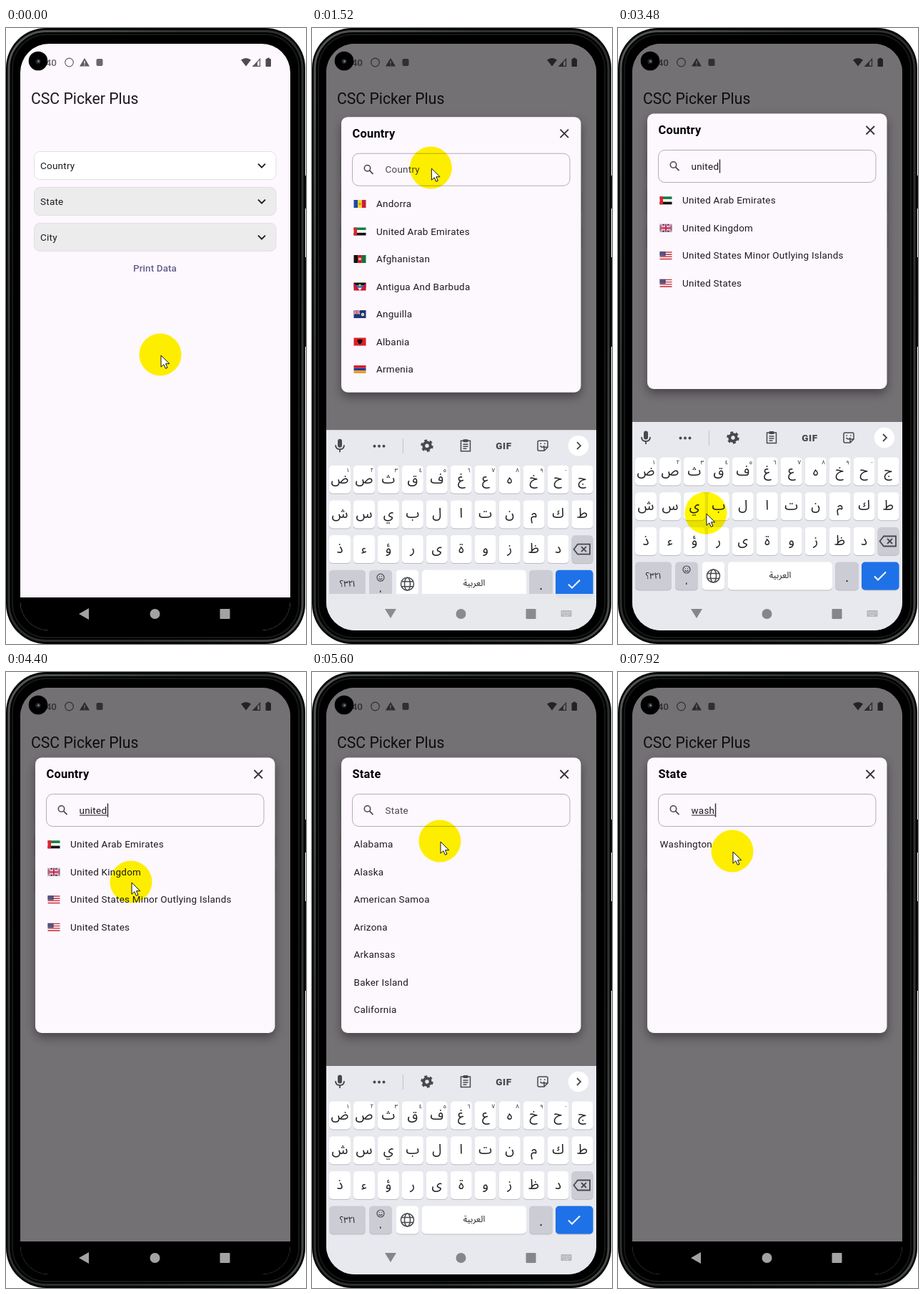
Recreate the animation shown at these times as an HTML page. Size 420x860 px, loop 8000 ms.

```html
<!DOCTYPE html>
<html lang="en">
<head>
<meta charset="utf-8">
<title>Country and state picker</title>
<style>
html, body { margin: 0; width: 100%; height: 100%; overflow: hidden; background: #fff; }
svg { display: block; width: 420px; height: 860px; }
text { font: 13.48px Roboto, sans-serif; letter-spacing: .24px; fill: #1d1b20; white-space: pre; }
.head { font-size: 21.2px; letter-spacing: 0; }
.title { font-size: 16.4px; font-weight: 700; fill: #000; }
.button { font-weight: 500; letter-spacing: .1px; fill: #65608c; }
.clock { font-weight: 500; letter-spacing: 0; fill: #6b676c; }
.hint { fill: #49454f; }
.ar { font-family: "Noto Sans Arabic", "Noto Sans", "DejaVu Sans", sans-serif; letter-spacing: 0; text-anchor: middle; fill: #202124; }
.line { fill: none; stroke: #47494d; stroke-width: 1.8; }
.mid { text-anchor: middle; }
</style>
</head>
<body>
<svg viewBox="0 0 420 860" xmlns="http://www.w3.org/2000/svg">
  <defs>
    <clipPath id="screen"><rect x="20" y="22" width="378" height="819" rx="40"/></clipPath>
    <linearGradient id="rim" x2="1" y2="1">
      <stop offset="0" stop-color="#555957"/><stop offset=".3" stop-color="#2c302e"/>
      <stop offset=".7" stop-color="#2c302e"/><stop offset="1" stop-color="#474b49"/>
    </linearGradient>
  </defs>
  <rect x="417" y="206" width="3" height="46" fill="#111"/>
  <rect x="417" y="320" width="3" height="125" fill="#111"/>
  <rect width="419" height="860" rx="56" fill="#050606"/>
  <rect x="4" y="4.500" width="411" height="851" rx="52" fill="#000" stroke="url(#rim)" stroke-width="3"/>
  <rect x="9" y="9" width="401" height="842" rx="48" fill="#000" stroke="#151817" stroke-width="2"/>
  <g clip-path="url(#screen)">
    <rect x="20" y="22" width="378" height="819" fill="#fdf7fe"/>
    <g id="status"></g>
    <text class="head" x="35" y="106">CSC Picker Plus</text>
    <g id="form"></g>
    <rect id="scrim" x="20" y="22" width="378" height="819" opacity="0"/>
    <g id="dialog"></g>
    <rect x="20" y="795" width="378" height="50"/>
    <g fill="#a3a3a3">
      <path d="M102 818l14-8v16z"/><circle cx="208.500" cy="818" r="7"/><rect x="299.500" y="811" width="14" height="14" rx="1"/>
    </g>
    <g id="keyboard"></g>
    <g id="nav" fill="#85868a">
      <rect x="20" y="790" width="378" height="55" fill="#e8e9ee"/>
      <path d="M102 811h16l-8 13z"/><circle cx="208.500" cy="818" r="7"/><rect x="299.500" y="811" width="14" height="14" rx="1"/>
      <rect x="348.500" y="813" width="15" height="9" rx="1" fill="#b4b5ba"/>
      <path d="M350 815.500h12M350 818h12M352.500 820.500h7" stroke="#e8e9ee" stroke-dasharray="1.500 1"/>
    </g>
  </g>
  <circle cx="45" cy="46" r="13.300"/>
  <circle cx="45" cy="46.500" r="3.500" fill="#24282b"/><circle cx="45.500" cy="46.500" r="1.300" fill="#8d9498"/>
  <g id="halo" style="mix-blend-mode:multiply"><circle r="29.500" fill="#fff600"/></g>
  <path id="arrow" d="M1 1v16.200l3.900-3.500 2.500 5.600 2.600-1.100-2.500-5.500h5.300z" fill="#fff" stroke="#111" stroke-linejoin="round"/>
</svg>
<script>
const $ = id => document.getElementById(id);
const rect = (x, y, w, h, fill, more = '') => `<rect x="${x}" y="${y}" width="${w}" height="${h}" fill="${fill}" ${more}/>`;
const dot = (x, y, r, fill) => `<circle cx="${x}" cy="${y}" r="${r}" fill="${fill}"/>`;
const text = (x, y, s, cls = '', more = '') => `<text x="${x}" y="${y}" class="${cls}" ${more}>${s}</text>`;
const path = (d, more = '') => `<path d="${d}" ${more}/>`;

// Flags, 17 by 11
const rows = (...c) => c.map((f, i) => rect(0, i * 11 / c.length, 17, 11 / c.length, f)).join('');
const cols = (...c) => c.map((f, i) => rect(i * 17 / c.length, 0, 17 / c.length, 11, f)).join('');
const union = '<g>' + rect(0, 0, 17, 11, '#1d3a80')
  + path('M0 0L17 11M17 0L0 11', 'stroke="#fff" stroke-width="2.4"') + path('M0 0L17 11M17 0L0 11', 'stroke="#d0233c" stroke-width=".9"')
  + path('M8.500 0V11M0 5.500H17', 'stroke="#fff" stroke-width="3.800"') + path('M8.500 0V11M0 5.500H17', 'stroke="#d0233c" stroke-width="2.200"') + '</g>';
const ensign = rows('#1c3578') + `<g transform="scale(.5)">${union}</g>`;
const stars = rows('#c8313e', '#fff', '#c8313e', '#fff', '#c8313e', '#fff', '#c8313e') + rect(0, 0, 8, 6, '#3c3b6e')
  + path('M1 1.500H7M1 3H7M1 4.500H7', 'stroke="#b9b9d0" stroke-width=".6" stroke-dasharray=".8 .7"');
const flags = {
  AD: cols('#1d4aa0', '#f6d21c', '#cf1a3b') + dot(8.5, 5.5, 1.6, '#b9863f'),
  AE: rows('#148040', '#fff', '#111') + rect(0, 0, 4.5, 11, '#e0222f'),
  AF: cols('#111', '#c4161f', '#11753a') + dot(8.5, 5.5, 2, '#e8b9b5'),
  AG: rows('#111', '#2270c0', '#fff') + path('M0 0L8.500 11H0zM17 0L8.500 11H17z', 'fill="#cd1530"') + dot(8.5, 3.5, 1.6, '#f6cf1c'),
  AI: ensign + dot(12.5, 6, 2.2, '#eee') + dot(12.5, 6, 1, '#e58a2c'),
  AL: rows('#dd1f26') + path('M8.500 2l4 1-1.500 4-2.500 2.500L6 7 4.500 3z', 'fill="#111"'),
  AM: rows('#d4202c', '#1e3c9a', '#ee9d1f'),
  AU: ensign + dot(4, 8.5, 1, '#fff') + dot(13, 3, .8, '#fff') + dot(13, 8, .8, '#fff'),
  AW: rows('#4189dd') + rect(0, 7, 17, .8, '#f9d616') + dot(3, 3, 1.2, '#d21034'),
  BE: cols('#111', '#fae042', '#ed2939'),
  BF: rows('#ef2b2d', '#009e49') + dot(8.5, 5.5, 1.7, '#fcd116'),
  BI: rows('#ce1126', '#1eb53a', '#ce1126') + dot(8.5, 5.5, 2.8, '#fff'),
  BN: rows('#f7e017') + path('M0 1L17 8', 'stroke="#fff" stroke-width="3"') + path('M0 3L17 10', 'stroke="#111" stroke-width="1.500"'),
  GB: union,
  HU: rows('#ce2939', '#fff', '#477050'),
  RE: cols('#22409a', '#fff', '#e0303a'),
  TN: rows('#e0202a') + dot(8.5, 5.5, 3, '#fff') + dot(8.5, 5.5, 1.5, '#e0202a'),
  US: stars, UM: stars
};
const flag = (code, x, y) => `<g transform="translate(${x} ${y})">${flags[code]}</g>`;

const names = {
  AD: 'Andorra', AE: 'United Arab Emirates', AF: 'Afghanistan', AG: 'Antigua And Barbuda', AI: 'Anguilla', AL: 'Albania',
  AM: 'Armenia', AU: 'Australia', AW: 'Aruba', BE: 'Belgium', BF: 'Burkina Faso', BI: 'Burundi', BN: 'Brunei',
  GB: 'United Kingdom', HU: 'Hungary', RE: 'Reunion', TN: 'Tunisia', UM: 'United States Minor Outlying Islands', US: 'United States'
};
const states = ['Alabama', 'Alaska', 'American Samoa', 'Arizona', 'Arkansas', 'Baker Island', 'California', 'Delaware', 'Hawaii',
  'Howland Island', 'Iowa', 'New Hampshire', 'New Jersey', 'New Mexico', 'Wake Island', 'Washington'];
const modes = {
  Country: { items: Object.entries(names), word: 'united', start: 2390, step: 100, opened: 1130, hidden: 3960 },
  State: { items: states.map(s => ['', s]), word: 'wash', start: 5920, step: 160, opened: 5200, hidden: 7400 }
};

// Static parts
$('status').innerHTML = text(71, 53, '2:40', 'clock', 'text-anchor="end"')
  + '<circle cx="88.500" cy="48" r="5.800" fill="none" stroke="#6b676c" stroke-width="1.200"/>'
  + path('M110 42l7 11.500h-14z', 'fill="#5f5b60"') + path('M110 46v4M110 51v1.300', 'stroke="#fdf7fe" stroke-width="1.300"')
  + rect(126.5, 43, 9, 10, '#6b676c', 'rx="2"')
  + path('M329 44.500q7-5 14 0l-7 9z', 'fill="#4f4b50"')
  + path('M346 53.300h9.500v-10z', 'fill="none" stroke="#5f5b60" stroke-width="1.300"') + path('M346 53.300h6v-6z', 'fill="#5f5b60"')
  + rect(363.5, 43, 7.5, 11, '#4f4b50', 'rx="1"') + rect(365.5, 41.7, 3.5, 2, '#4f4b50');

const field = (y, label, on, code) => rect(39.5, y, 338.5, 39, on ? '#fff' : '#ececec', 'rx="8" stroke="#e3dee5"')
  + (code ? flag(code, 48, y + 14) : '') + text(code ? 79 : 48, y + 24, label)
  + path(`M353 ${y + 17.2}l5 5 5-5`, 'fill="none" stroke="#1d1b20" stroke-width="1.900"');
const form = picked => field(172.5, picked ? names.US : 'Country', true, picked && 'US')
  + field(222.5, 'State', picked) + field(272.5, 'City', false)
  + text(208.5, 340, 'Print Data', 'button mid')
  + (picked ? flag('US', 152, 362.5) + text(183, 373, names.US) : '');

function keyboard() {
  const key = (x, y, w, fill = '#fff') => rect(x, y + 1, w, 39, '#b9bbc2', 'rx="5"') + rect(x, y, w, 39, fill, 'rx="5"');
  const gray = '#cccdd4';
  let out = rect(20, 550, 378, 300, '#e8e9ee');
  ['ضصثقفغعهخحج', 'شسيبلاتنمكط', 'ذءؤرىةوزظد'].forEach((row, r) => [...row].forEach((c, i) => {
    const x = 24 + i * 33.95, y = 599.5 + r * 48.7;
    out += key(x, y, 30) + text(x + 15, y + 25, c, 'ar', 'style="font-size:19px"');
    if (!r && i < 10) out += text(x + 26, y + 9, '١٢٣٤٥٦٧٨٩٠'[i], 'ar', 'style="font-size:8px"');
  }));
  out += key(363.5, 697, 30, gray)
    + path('M366.500 716.500l5.500-7h17v14h-17zM377 713l7 7M384 713l-7 7', 'class="line"')
    + key(24, 745.5, 51, gray) + text(49.5, 769, '٣٢١؟', 'ar', 'style="font-size:12px"')
    + key(80, 745.5, 32, gray) + '<circle cx="96" cy="756" r="5" class="line" style="stroke-width:1.200"/>'
    + path('M93.500 757q2.500 3 5 0M94 754.500h1M97 754.500h1', 'class="line" style="stroke-width:1.200"') + text(96, 777, '،', 'ar')
    + key(117.5, 745.5, 32) + '<g class="line" style="stroke-width:1.500"><circle cx="133.500" cy="765" r="9"/><ellipse cx="133.500" cy="765" rx="4" ry="9"/><path d="M125.500 761.500h16M125.500 768.500h16"/></g>'
    + key(154, 745.5, 146) + text(227, 768, 'العربية', 'ar', 'style="font-size:12px"')
    + key(304, 745.5, 33, gray) + text(320.5, 773, '.', 'ar', 'style="font-size:17px"')
    + key(341, 745.5, 52.5, '#1f71e8') + path('M359 765.500l5 5 11-11', 'fill="none" stroke="#fff" stroke-width="2"');
  // Toolbar
  out += rect(36, 562.5, 6, 12, '#47494d', 'rx="3"') + path('M33 571q0 6 6 6t6-6M39 577v4', 'class="line"')
    + [87.5, 94, 100.5].map(x => dot(x, 572.5, 2, '#47494d')).join('')
    + rect(127, 562, 1, 21, '#c3c4ca')
    + '<circle cx="161" cy="572" r="7" fill="none" stroke="#47494d" stroke-width="3.500" stroke-dasharray="3.660"/><circle cx="161" cy="572" r="4.700" fill="none" stroke="#47494d" stroke-width="4"/>'
    + path('M208.500 565h13v14.500h-13zM211.500 570h7M211.500 573h7M211.500 576h5', 'class="line" style="stroke-width:1.500"') + rect(211.5, 563, 7, 4, '#47494d', 'rx="1"')
    + text(268.5, 577, 'GIF', 'mid', 'style="font-weight:900;font-size:13.500px;fill:#47494d;letter-spacing:.6px"')
    + path('M318 565h10q2 0 2 2v7l-5 5h-7q-2 0-2-2v-10q0-2 2-2zM330 574h-5v5M319.500 572q3 4 6 0M319.500 569h1.500M325 569h1.500', 'class="line" style="stroke-width:1.500"')
    + dot(373, 572, 14.3, '#fff') + path('M371 567l5 5-5 5', 'class="line"');
  return out;
}
$('keyboard').innerHTML = keyboard();

$('dialog').innerHTML = rect(41, 119.5, 335.5, 384.5, '#fdf7fe', 'rx="9" style="filter:drop-shadow(0 6px 7px #0006)"')
  + text(56.5, 148, '', 'title', 'id="title"') + path('M347.500 137l11.500 11.500M359 137l-11.500 11.500', 'class="line" style="stroke:#333"')
  + rect(56.5, 170.5, 304.5, 45, 'none', 'rx="9" stroke="#b3adb6"')
  + '<circle cx="77.500" cy="191" r="4.200" class="line" style="stroke-width:1.600"/>' + path('M80.500 194.200l5 5', 'class="line"')
  + text(102.5, 197.5, '', '', 'id="query"') + rect(103, 199.5, 0, 1, '#1d1b20', 'id="under"')
  + rect(103, 183.5, 1.5, 19, '#39363d', 'id="caret"') + '<g id="list"></g>';

function fill(mode, typed) {
  $('title').textContent = mode;
  $('query').textContent = typed || mode;
  $('query').setAttribute('class', typed ? '' : 'hint');
  const found = modes[mode].items.filter(([, s]) => s.toLowerCase().includes(typed)).slice(0, 7);
  $('list').innerHTML = found.map(([code, s], i) => {
    const y = 245.3 + i * 38.5;
    return (code ? flag(code, 58.5, y - 10) : '') + text(code ? 90 : 58.5, y, s);
  }).join('');
}

// Timelines: [ms, value, ...]
const fade = [[1400, 0], [1500, 1], [4680, 1], [4780, 0], [5200, 0], [5280, .52], [5320, .52], [5400, 1]];
const lift = [[1400, 94], [1540, 0], [4790, 0], [4791, 121.500], [5340, 121.500], [5540, 0]];
const keys = [[1280, 0], [1320, .234], [1400, .234], [1540, 1], [3880, 1], [4060, 0], [5340, 0], [5540, 1], [7330, 1], [7510, 0]];
const mouse = [[80, 216, 456], [880, 166, 194], [1400, 166, 194], [1700, 167, 197], [2990, 167, 197], [3700, 110, 818], [4020, 110, 818],
  [4400, 175, 293], [4480, 175, 293], [4620, 150, 354], [4720, 150, 354], [5080, 179, 236], [6560, 179, 236], [7220, 110, 818],
  [7480, 110, 818], [7920, 160, 250]];

function at(line, t) {
  const i = line.findIndex(k => k[0] > t);
  if (i < 0) return line[line.length - 1].slice(1);
  if (!i) return line[0].slice(1);
  const a = line[i - 1], b = line[i], p = (t - a[0]) / (b[0] - a[0]), e = p * p * (3 - 2 * p);
  return a.slice(1).map((v, n) => v + (b[n + 1] - v) * e);
}
const move = (id, x, y) => $(id).setAttribute('transform', `translate(${x} ${y})`);
const set = (id, name, v) => $(id).setAttribute(name, v);

let shownForm, shownList;
function draw(t) {
  const picked = t >= 4680;
  if (picked !== shownForm) $('form').innerHTML = form(shownForm = picked);

  const mode = t < 4790 ? 'Country' : 'State', m = modes[mode];
  const count = Math.max(0, Math.min(m.word.length, Math.floor((t - m.start) / m.step) + 1));
  const typed = m.word.slice(0, count), id = mode + typed;
  if (id !== shownList) fill(mode, typed), shownList = id;

  const [alpha] = at(fade, t), [dy] = at(lift, t), [k] = at(keys, t);
  set('scrim', 'opacity', alpha * .54);
  set('dialog', 'opacity', alpha);
  move('dialog', 0, dy);
  const width = typed ? $('query').getComputedTextLength() : 0;
  const since = t - (count ? m.start + (count - 1) * m.step : m.opened);
  set('caret', 'x', 103 + width);
  set('caret', 'opacity', since % 500 < 250 ? 1 : 0);
  set('under', 'width', t >= m.hidden ? width : 0);

  move('keyboard', 0, 291 * (1 - k));
  set('keyboard', 'visibility', k > 0 ? 'visible' : 'hidden');
  set('nav', 'opacity', Math.max(0, (k - .3) / .7));

  const [x, y] = at(mouse, t);
  move('halo', x, y);
  move('arrow', x, y);
}
const begin = performance.now();
(function tick() {
  draw((performance.now() - begin) % 8000);
  requestAnimationFrame(tick);
})();
</script>
</body>
</html>
```
